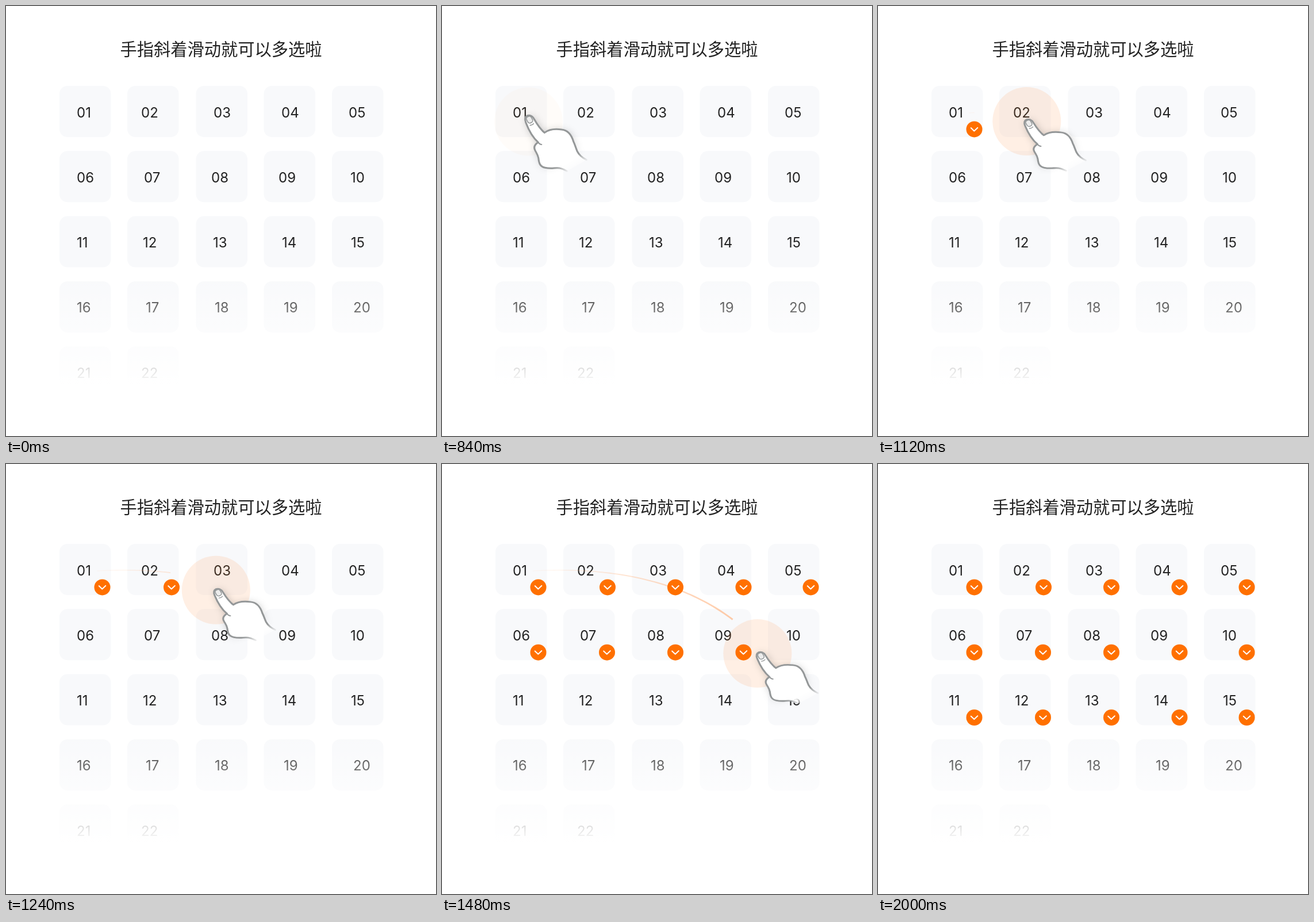
An HTML page with a canvas for the animation above (3 s loop, 748 px wide and 748 px high).

```html
<!DOCTYPE html>
<html lang="zh-CN">
<head>
<meta charset="utf-8">
<title>滑动多选</title>
<style>
html, body { margin: 0; width: 100%; height: 100%; overflow: hidden; background: #fff; }
canvas { display: block; width: 748px; height: 748px; }
</style>
</head>
<body>
<canvas id="stage" width="748" height="748" lang="zh-CN"></canvas>
<script>
const ctx = document.getElementById('stage').getContext('2d');
const LOOP = 3000, TICK = 40;
const ORANGE = '#ff7000', INK = '#222', LINE = '148,151,152';

const cardX = [93, 211, 330.5, 448.5, 567];
const badgeX = [167.5, 288, 406, 524.5, 641.5];
const rowY = row => 139 + row * 113.3;
const labelX = [
  124, 236, 362, 480, 597,
  124, 241, 358, 475, 600,
  124, 239, 361, 481, 601,
  124, 244, 364, 484, 605,
  124, 236
];

const clamp = v => Math.max(0, Math.min(1, v));
const ramp = (t, from, to) => clamp((t - from) / (to - from));
const mix = (a, b, k) => a + (b - a) * k;

// Cubic curve sampled so that it can be walked at constant speed.
function makePath(p) {
  const at = s => [0, 1].map(i => {
    const r = 1 - s;
    return r * r * r * p[0][i] + 3 * r * r * s * p[1][i] + 3 * r * s * s * p[2][i] + s * s * s * p[3][i];
  });
  const N = 200, pts = [at(0)], len = [0];
  for (let i = 1; i <= N; i++) {
    pts.push(at(i / N));
    len.push(len[i - 1] + Math.hypot(pts[i][0] - pts[i - 1][0], pts[i][1] - pts[i - 1][1]));
  }
  return u => {
    const goal = clamp(u) * len[N];
    let i = 1;
    while (i < N && len[i] < goal) i++;
    const k = (goal - len[i - 1]) / (len[i] - len[i - 1]);
    return [mix(pts[i - 1][0], pts[i][0], k), mix(pts[i - 1][1], pts[i][1], k)];
  };
}

const haloPath = makePath([[150.5, 201], [300, 189], [500, 216], [612.5, 417]]);
const handPath = makePath([[143.5, 192], [296, 187], [494, 212], [610, 412]]);
const trail = makePath([[158, 186], [300, 178], [505, 200], [607, 390]]);

function drawGrid() {
  ctx.font = '24px Inter, Roboto, sans-serif';
  ctx.textAlign = 'left';
  labelX.forEach((left, i) => {
    const y = rowY(Math.floor(i / 5));
    ctx.fillStyle = '#f8f9fb';
    ctx.beginPath();
    ctx.roundRect(cardX[i % 5], y, 89.5, 89, 14);
    ctx.fill();
    const text = String(i + 1).padStart(2, '0');
    ctx.fillStyle = INK;
    ctx.fillText(text, left + ctx.measureText(text).actualBoundingBoxLeft, Math.round(y + 54.5));
  });
  const veil = ctx.createLinearGradient(0, 458, 0, 660);
  veil.addColorStop(0, 'rgba(255,255,255,0)');
  veil.addColorStop(1, '#fff');
  ctx.fillStyle = veil;
  ctx.fillRect(0, 458, 748, 290);
}

function drawTitle() {
  ctx.font = '29.25px "Noto Sans CJK SC", "Noto Sans CJK", sans-serif';
  ctx.textAlign = 'center';
  ctx.fillStyle = INK;
  ctx.fillText('手指斜着滑动就可以多选啦', 374, 86);
}

function drawBadge(i) {
  const row = Math.floor(i / 5);
  const x = badgeX[i % 5] - (row && i % 5 === 1 ? 1 : 0);
  const y = rowY(row) + 75.4;
  ctx.fillStyle = ORANGE;
  ctx.beginPath();
  ctx.arc(x, y, 14, 0, Math.PI * 2);
  ctx.fill();
  ctx.strokeStyle = '#fff';
  ctx.lineWidth = 2;
  ctx.lineCap = ctx.lineJoin = 'round';
  ctx.beginPath();
  ctx.moveTo(x - 5.8, y - 2.3);
  ctx.lineTo(x - 0.2, y + 3);
  ctx.lineTo(x + 5.8, y - 2.7);
  ctx.stroke();
}

// First three are ticked as the finger leaves them, the rest two per tick.
const badgeTime = i => i < 3 ? [1040, 1160, 1320][i] : 1400 + Math.floor((i - 3) / 2) * TICK;

function drawHalo([x, y], alpha) {
  ctx.globalAlpha = alpha;
  ctx.fillStyle = 'rgba(255,122,36,0.122)';
  ctx.beginPath();
  ctx.arc(x, y, 59.5, 0, Math.PI * 2);
  ctx.fill();
  ctx.globalAlpha = 1;
}

function drawTrail(u, alpha) {
  if (u <= 0) return;
  const steps = 60, upper = [], lower = [];
  for (let i = 0; i <= steps; i++) {
    const s = u * i / steps;
    const [x, y] = trail(s), [ax, ay] = trail(s - 0.005), [bx, by] = trail(s + 0.005);
    const d = Math.hypot(bx - ax, by - ay), w = mix(0.6, 1.8, s);
    const nx = -(by - ay) / d * w, ny = (bx - ax) / d * w;
    upper.push([x + nx, y + ny]);
    lower.unshift([x - nx, y - ny]);
  }
  const shade = ctx.createLinearGradient(158, 0, 600, 0);
  shade.addColorStop(0, 'rgba(255,184,136,0.08)');
  shade.addColorStop(1, 'rgba(255,184,136,0.9)');
  ctx.globalAlpha = alpha;
  ctx.fillStyle = shade;
  ctx.beginPath();
  upper.concat(lower).forEach(p => ctx.lineTo(...p));
  ctx.fill();
  if (u > 0.98) {
    ctx.fillStyle = '#ffc199';
    ctx.beginPath();
    [[613, 400], [594.5, 387], [605.5, 388], [612.5, 378]].forEach(p => ctx.lineTo(...p));
    ctx.fill();
  }
  ctx.globalAlpha = 1;
}

const handShape = new Path2D(
  'M109 81C101 77 96 72 93 66C90 59 89 54 86.5 49C83 37 76 28.5 66 27.5C56 26 45 26 36 33' +
  'C29 27 23 18 18 9C15 3 10 1.5 6 3C2 5 1.5 9.5 3.5 15C8 27 16 42 25 50' +
  'C19 54 17 59 19.5 64C22 69 24.5 72 25.500 78C26.5 88 28.5 93 37 95C46 97 52 95.5 58 95.5C64 95.5 70 98 75 101');
const handFold = new Path2D('M25 50C27 53 29 54 31 54M36 33L32.5 30.5');
const knuckle = new Path2D('M11 20Q15 19.5 17 17');

// Gradient that dissolves towards the open wrist.
function wristFade(rgb, x0, y0, x1, y1) {
  const g = ctx.createLinearGradient(x0, y0, x1, y1);
  g.addColorStop(0, `rgba(${rgb},1)`);
  g.addColorStop(1, `rgba(${rgb},0)`);
  return g;
}

function drawHand(x, y, squash, alpha) {
  ctx.save();
  ctx.globalAlpha = alpha;
  ctx.translate(x, y);
  ctx.scale(1, squash);
  ctx.lineCap = ctx.lineJoin = 'round';

  // The shadow dissolves before the white body does, so none shows at the wrist.
  ctx.shadowColor = 'rgba(0,0,0,0.24)';
  ctx.shadowBlur = 14;
  ctx.shadowOffsetX = ctx.shadowOffsetY = 2;
  ctx.fillStyle = wristFade('255,255,255', 58, 45, 84, 84);
  ctx.fill(handShape);
  ctx.shadowColor = 'transparent';
  ctx.fillStyle = wristFade('255,255,255', 84, 82, 96, 102);
  ctx.fill(handShape);

  ctx.strokeStyle = wristFade(LINE, 82, 78, 92, 95);
  ctx.lineWidth = 3.1;
  ctx.stroke(handShape);
  ctx.strokeStyle = `rgb(${LINE})`;
  ctx.lineWidth = 2;
  ctx.stroke(handFold);
  ctx.lineWidth = 1.6;
  ctx.stroke(knuckle);
  ctx.translate(10, 10);
  ctx.rotate(-0.48);
  ctx.fillStyle = '#ececec';
  ctx.beginPath();
  ctx.roundRect(-4.6, -6, 9.2, 12, 4);
  ctx.fill();
  ctx.stroke();
  ctx.restore();
}

function draw(t) {
  ctx.fillStyle = '#fff';
  ctx.fillRect(0, 0, 748, 748);
  drawTitle();
  drawGrid();

  const leave = 1 - ramp(t, 1760, 2000);
  const press = ramp(t, 800, 1000);
  const u = ramp(t, 1000, 1600);

  drawHalo(haloPath(u), press * leave);
  drawTrail(ramp(t, 1110, 1640), leave);
  for (let i = 0; i < 15; i++) if (t >= badgeTime(i)) drawBadge(i);

  const [x, y] = handPath(u), lift = 1 - press;
  const alpha = ramp(t, 200, 400) * leave;
  if (alpha > 0) drawHand(x - 1.5 * lift, y - 5 * lift, mix(0.91, 1, lift), alpha);
}

const start = performance.now();
function loop() {
  const t = (performance.now() - start) % LOOP;
  draw(Math.floor(t / TICK) * TICK);
  requestAnimationFrame(loop);
}
loop();
</script>
</body>
</html>
```
